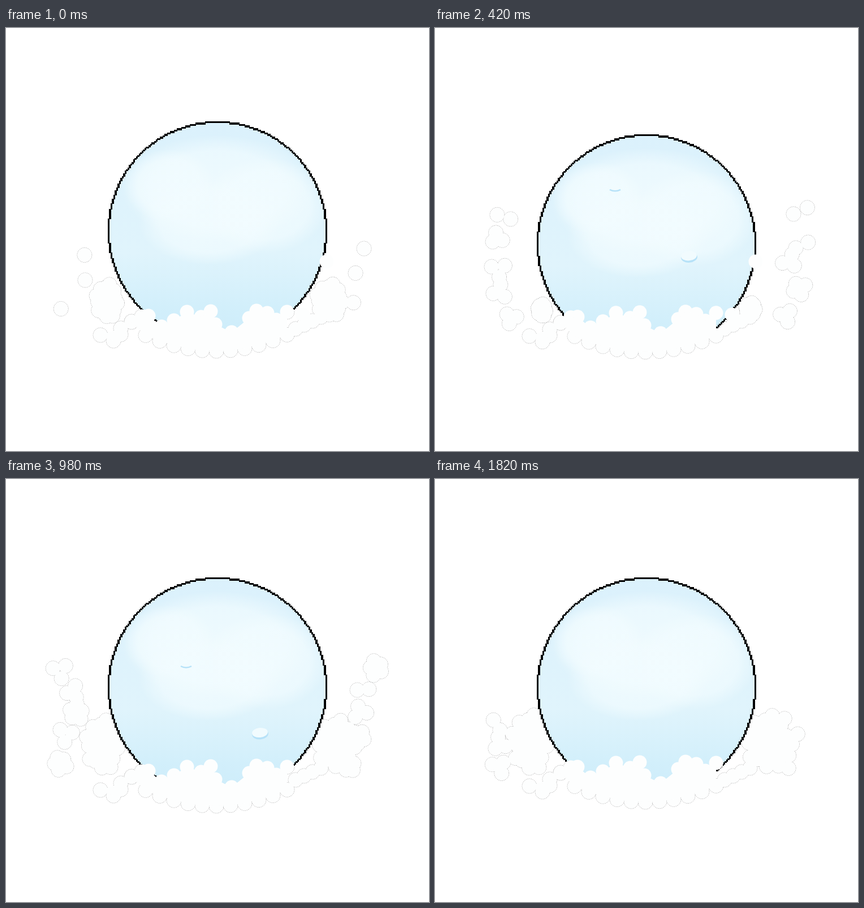
These frames come from a looping animation (748x748 px, 1890 ms). An HTML page with a canvas:

```html
<!DOCTYPE html>
<html lang="en">
<head>
<meta charset="utf-8">
<title>Ball in foam</title>
<style>
html, body { margin: 0; width: 100%; height: 100%; overflow: hidden; background: #fff; }
canvas { display: block; }
</style>
</head>
<body>
<canvas id="stage" width="748" height="748"></canvas>
<script>
const STEP = 70, COUNT = 27, R = 12.5, CELL = 2.5, CELLS = 77;
const CX = 374, TAU = Math.PI * 2, GOLDEN = 2.39996;
const FOAM = '#fdfefe', SHADE = '#b7e2f8', SHINE = '#f1fbfe';
const ctx = document.getElementById('stage').getContext('2d');

// Step, value pairs joined by straight lines.
const ballTop = [0,166, 1,164, 4,188, 6,189, 9,182, 11.5,166, 14,175, 17,186, 18,184, 22,167, 24,175, 26,175];
const foamDip = [0,0, 5,0, 9,7, 14,7, 17,0, 26,0];
const bankSize = [0,0.6, 4,0.65, 7,0, 11,0, 14,0.9, 18,1, 26,1];
const smallDrop = [2,82, 4,88, 9,115, 14,158, 18,217, 22,309, 26,425];
const largeDrop = [2,200, 4,205, 9,231, 14,275, 18,335];

// Crest of the front foam, left to right.
const crest = [[167,543], [203,531], [222,519], [240,510], [252,509], [275,528], [297,517], [320,502], [345,511],
  [362,501], [370,524], [399,538], [430,513], [443,500], [462,504], [478,516], [497,502]];

// Each splash: middle step, height of its top puff, puffs per side, most bubbles per puff.
const splashes = [[0, 382, 3, 1], [4, 308, 5, 4], [9, 440, 3, 4], [14, 318, 5, 5],
  [18, 384, 1, 2], [22, 320, 4, 4], [26, 418, 3, 3]];

function track(keys, n) {
  let i = 0;
  while (i < keys.length - 4 && n > keys[i + 2]) i += 2;
  const [a, va, b, vb] = keys.slice(i, i + 4);
  return va + (vb - va) * (n - a) / (b - a);
}

function seeded(seed) {
  let s = seed * 7919 + 17;
  return () => (s = s * 16807 % 2147483647) / 2147483647;
}

function disc(g, x, y, r) {
  g.beginPath();
  g.arc(x, y, r, 0, TAU);
}

function makeBall() {
  const c = document.createElement('canvas');
  c.width = c.height = 400;
  const g = c.getContext('2d');
  g.translate(200, 200);
  disc(g, 0, 0, CELLS * CELL);
  g.save();
  g.clip();
  const base = g.createLinearGradient(0, -193, 0, 193);
  base.addColorStop(0, '#dbf1fc');
  base.addColorStop(0.6, '#e0f4fc');
  base.addColorStop(0.85, '#d2effb');
  base.addColorStop(1, '#cdecfa');
  g.fillStyle = base;
  g.fillRect(-200, -200, 400, 400);
  for (const [x, y, rx, ry] of [[0, -75, 170, 95], [-85, -80, 80, 65], [-15, -15, 125, 75], [85, -45, 110, 85]]) {
    g.save();
    g.translate(x, y);
    g.scale(rx, ry);
    const glow = g.createRadialGradient(0, 0, 0, 0, 0, 1);
    glow.addColorStop(0, 'rgba(242,252,255,.8)');
    glow.addColorStop(0.7, 'rgba(242,252,255,.65)');
    glow.addColorStop(1, 'rgba(242,252,255,0)');
    g.fillStyle = glow;
    g.fillRect(-1, -1, 2, 2);
    g.restore();
  }
  g.restore();
  // Stepped outline on whole pixels, mirrored into eight octants.
  g.fillStyle = '#000';
  const dot = (x, y) => {
    const l = Math.floor((x - 0.5) * CELL), t = Math.floor((y - 0.5) * CELL);
    g.fillRect(l, t, Math.ceil((x + 0.5) * CELL) - l, Math.ceil((y + 0.5) * CELL) - t);
  };
  for (let x = 0; x <= CELLS * Math.SQRT1_2; x++) {
    const y = Math.round(Math.sqrt(CELLS * CELLS - x * x));
    for (const sx of [-x, x]) for (const sy of [-y, y]) {
      dot(sx, sy);
      dot(sy, sx);
    }
  }
  return c;
}
const ball = makeBall();

function drawBall(top, floor) {
  ctx.save();
  ctx.beginPath();
  ctx.rect(0, 0, 748, floor);
  ctx.clip();
  ctx.drawImage(ball, CX - 200, top - 7);
  ctx.restore();
}

function oval(x, y, rx, ry, color) {
  ctx.fillStyle = color;
  ctx.beginPath();
  ctx.ellipse(x, y, rx, ry, -0.1, 0, TAU);
  ctx.fill();
}

function drawSmallDrop(y) {
  oval(318.5, y - 3, 8, 5, SHINE);
  ctx.strokeStyle = SHADE;
  ctx.lineWidth = 2.5;
  ctx.beginPath();
  ctx.moveTo(309, y - 2);
  ctx.quadraticCurveTo(318.5, y + 3, 328, y - 2);
  ctx.stroke();
}

function drawLargeDrop(y) {
  oval(449.5, y + 1, 14.5, 9.5, SHADE);
  oval(449, y - 1.5, 14, 8.5, SHINE);
}

// A heap beside the ball that swells out of the front foam.
function bank(side, size) {
  if (size <= 0) return [];
  const out = [], spots = 26;
  const [bx, by, x, y, rx, ry] = side < 0 ? [195, 508, 168, 466, 33, 52] : [550, 505, 588, 465, 40, 50];
  for (let i = 0; i < spots; i++) {
    const r = Math.sqrt((i + 0.5) / spots), a = i * GOLDEN;
    out.push([bx + size * (x - bx + rx * r * Math.cos(a)), by + size * (y - by + ry * r * Math.sin(a))]);
  }
  if (side > 0) for (let k = 0; k < 4; k++) out.push([512 + 15 * k, 532 - 7 * k]);
  return out;
}

// Puffs fan out beside the ball, drift away from it and fall.
function splash([mid, top, puffs, most], n) {
  const d = n - mid, out = [];
  if (Math.abs(d) > 2) return out;
  const rand = seeded(mid + 1);
  for (const side of [-1, 1]) for (let k = 0; k < puffs; k++) {
    const x = CX + side * (232 + 50 * rand() + 3 * d);
    const y = top + k * (530 - top) / puffs + 22 * rand() + 6 * d + 0.8 * d * d;
    const count = Math.ceil(most * (0.3 + 0.7 * rand())), turn = TAU * rand();
    for (let i = 0; i < count; i++) {
      const a = turn + TAU * i / count, r = count > 1 ? 9 + 5 * rand() : 0;
      out.push([x + r * Math.cos(a), y + r * Math.sin(a)]);
    }
  }
  return out;
}

function rim(dip) {
  const out = crest.map(([x, y]) => [x, y + dip]);
  for (let x = 497; x > 240; x -= 25) out.push([x, 571 - 0.0018 * (x - 371) ** 2 + dip]);
  for (const [x, y] of [[222, 520], [203, 542], [190, 553]]) out.push([x, y + dip]);
  return out;
}

function outline(list) {
  ctx.strokeStyle = '#a6a6a6';
  ctx.lineWidth = 1;
  ctx.setLineDash([1.5, 1.5]);
  for (const [x, y] of list) {
    disc(ctx, x, y, R + 0.4);
    ctx.stroke();
  }
  ctx.setLineDash([]);
}

function fill(list) {
  ctx.fillStyle = FOAM;
  for (const [x, y] of list) {
    disc(ctx, x, y, R);
    ctx.fill();
  }
}

function draw(n) {
  ctx.fillStyle = '#fff';
  ctx.fillRect(0, 0, 748, 748);

  const dip = track(foamDip, n), size = track(bankSize, n), top = Math.round(track(ballTop, n));
  const side = [...bank(-1, size), ...bank(1, size), ...splashes.flatMap(s => splash(s, n))];
  const front = rim(dip);

  outline(side.concat(front));
  fill(side);
  drawBall(top, 560 + dip);
  if (n >= 2 && n <= 24) drawSmallDrop(top + track(smallDrop, n));
  if (n >= 2 && n <= 18) drawLargeDrop(top + track(largeDrop, n));

  fill(front);
  ctx.beginPath();
  for (const [x, y] of front) ctx.lineTo(x, y);
  ctx.fill();
  if (n <= 6 || n >= 16 && n <= 23) fill([[567, 413], [525, 507]]);
}

let last = -1;
function tick() {
  const n = Math.floor(performance.now() / STEP) % COUNT;
  if (n !== last) draw(last = n);
  requestAnimationFrame(tick);
}
tick();
</script>
</body>
</html>
```
